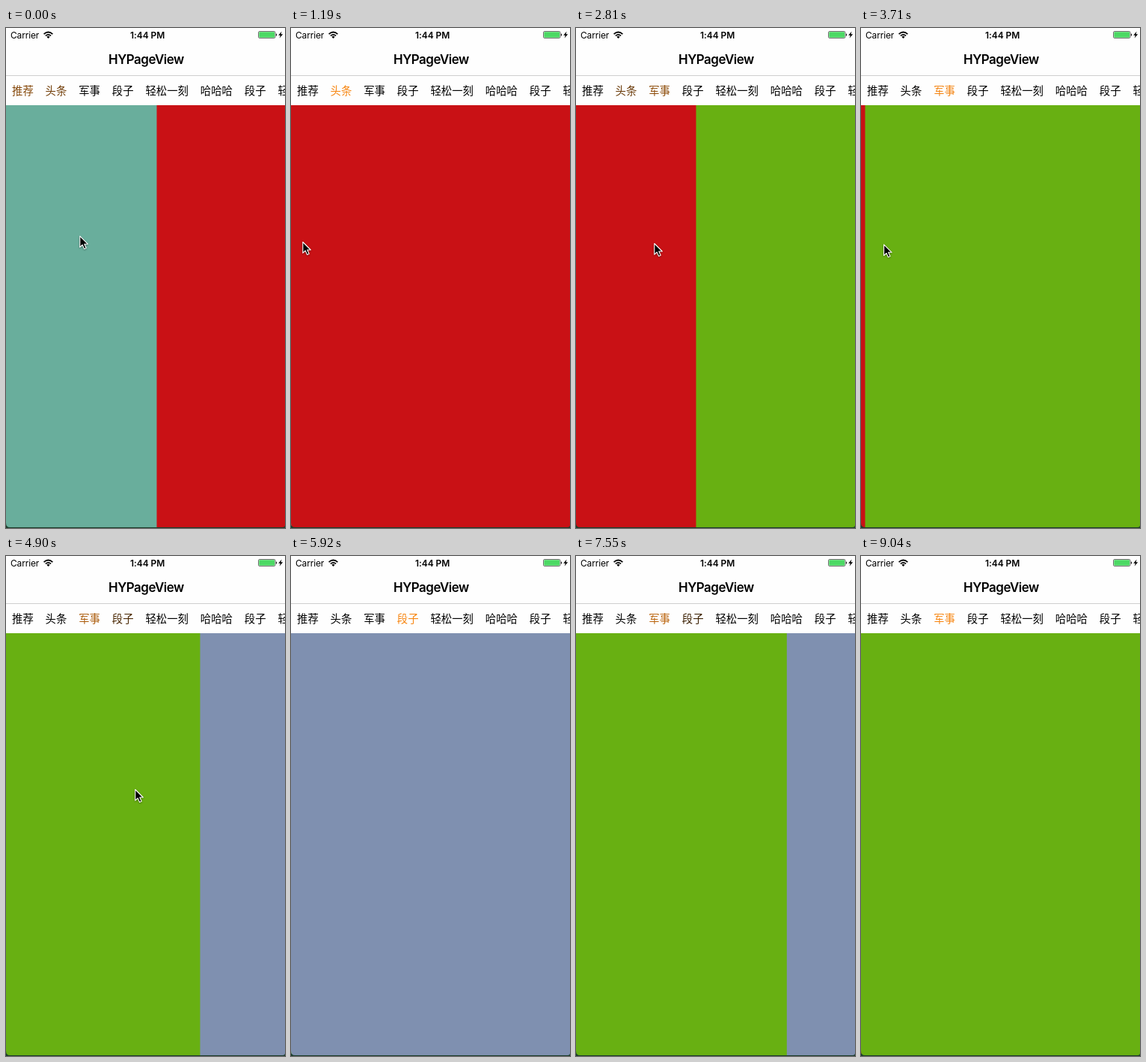
An HTML page that plays this animation: 373x667 px, repeating every 9.68 s.

```html
<!DOCTYPE html>
<html lang="zh-CN">
<head>
<meta charset="utf-8">
<title>HYPageView</title>
<style>
  html, body { margin: 0; width: 100%; height: 100%; overflow: hidden; background: #fefefe; }
  svg { display: block; width: 373px; height: 667px; }
  text { font-family: Inter, Roboto, sans-serif; }
  #tabs text { font: 14.4px "Noto Sans CJK SC", "Noto Sans CJK", "Noto Sans", sans-serif; }
</style>
</head>
<body>
<svg viewBox="0 0 373 667">
  <defs>
    <clipPath id="screen"><path d="M0 103H373V663Q373 666 370 666H5Q0 666 0 660Z"/></clipPath>
  </defs>
  <rect width="373" height="667" fill="#fefefe"/>
  <rect y="655" width="373" height="12" fill="#1b3d2b"/>
  <g clip-path="url(#screen)"><g id="pages"></g></g>

  <text x="6" y="13.6" font-size="12" letter-spacing="-.15">Carrier</text>
  <g fill="none" stroke="#000" stroke-width="1.7">
    <path d="M50.6 8.1Q56.5 2.9 62.4 8.1"/>
    <path d="M52.9 10.4Q56.5 7.2 60.1 10.4"/>
  </g>
  <path d="M54.4 11.7Q56.5 9.9 58.6 11.7L56.5 13.9Z"/>
  <text x="189.2" y="13.6" font-size="12" font-weight="600" letter-spacing="-.08" text-anchor="middle">1:44 PM</text>
  <rect x="337.5" y="4.5" width="22.5" height="9" rx="1.6" fill="#fff" stroke="#333" stroke-width=".7"/>
  <rect x="338.3" y="5.3" width="20.9" height="7.4" rx=".8" fill="#4cd964"/>
  <path d="M360.8 7.2Q362.3 7.6 362.3 9T360.8 10.8Z" fill="#222"/>
  <path d="M368.6 4.6L364.2 9.7H366.8L365.6 13.6L370.2 8.3H367.5Z"/>
  <text x="187.4" y="47.6" font-size="17" font-weight="600" letter-spacing="-.52" text-anchor="middle">HYPageView</text>
  <rect y="63" width="373" height="1" fill="#cfcfcf"/>
  <g id="tabs"></g>

  <path id="cursor" d="M.8 .5V15.2L4.2 12L6.6 17.4L9.2 16.3L6.8 11H11.3Z"
        stroke="#fff" stroke-width="1.1" stroke-linejoin="round"
        style="filter:drop-shadow(0 1px 1px rgba(0,0,0,.35))"/>
</svg>
<script>
const LOOP = 9680, TICK = 148.15, W = 373;
const COLORS = ['#69ae9c', '#c91115', '#68b012', '#7f90b0'];
const TITLES = ['推荐', '头条', '军事', '段子', '轻松一刻', '哈哈哈', '段子', '轻松一刻'];
const ORANGE = [247, 134, 18];
const DECAY = 0.57, SNAP = 4.5, REACH = 8, REST_X = 15;

// Times in ticks; x, y is where the pointer grabs the page
const SWIPES = [
  { from: 0, to: 1, start: -1.715, release: 1.5, pace: 100, power: 1, x: 269.5, y: 271 },
  { from: 1, to: 2, start: 16.875, release: 19, pace: 100, power: 1, x: 316.5, y: 287 },
  { from: 2, to: 3, start: 31.865, release: 35, pace: 100, power: 1, x: 285.5, y: 311 },
  { from: 3, to: 2, start: 44, release: 53, pace: 12.6, power: 1.597, x: 66, y: 309 }
];

const $ = id => document.getElementById(id);
const mix = (a, b, k) => a + (b - a) * k;
const smooth = k => k * k * (3 - 2 * k);
const pull = (s, n) => s.pace * (n - s.start) ** s.power;

function add(tag, parent, attrs, text = '') {
  const el = document.createElementNS('http://www.w3.org/2000/svg', tag);
  for (const key in attrs) el.setAttribute(key, attrs[key]);
  el.textContent = text;
  return parent.appendChild(el);
}

// The page follows the pointer, then glides to rest
function scrollAt(s, n) {
  const held = Math.min(n, s.release);
  const rest = (W - pull(s, held)) * DECAY ** (n - held);
  return s.to * W + (s.from - s.to) * (rest < SNAP ? 0 : rest);
}

// The pointer drags, rests, then reaches for the next grab point
function pointerAt(i, n) {
  if (n >= 55) {
    const k = (n - 55) / 5;
    return [mix(285, 302, k) - 148 * k * (1 - k), 441 + 192 * Math.sin(k * Math.PI / 2)];
  }
  const s = SWIPES[i], next = SWIPES[i + 1];
  const x = Math.max(REST_X, s.x + (s.from - s.to) * pull(s, n));
  if (!next) return [x, s.y];
  const lift = smooth(Math.min(1, (n - s.start) / 3.7));
  const y = i ? s.y : mix(257, 285, lift) + 14 * (1 - lift);
  const k = smooth(Math.max(0, 1 - (next.start - n) / REACH));
  return [mix(x, next.x, k), mix(y, next.y, k)];
}

const pointerShown = n => n < 35 || (n >= 42 && n < 51) || (n >= 55 && n < 61);

COLORS.forEach((fill, i) =>
  add('rect', $('pages'), { x: i * W, y: 103, width: W + 1, height: 564, fill }));

let left = 8;
const tabs = TITLES.map(title => {
  const el = add('text', $('tabs'), { x: left, y: 88.7 }, title);
  left += title.length * 14.4 + 15.8;
  return el;
});

function draw(ms) {
  const n = Math.floor((ms + 10) / TICK);
  const i = SWIPES.filter(s => s.start <= n).length - 1;
  const offset = scrollAt(SWIPES[i], n);
  const [x, y] = pointerAt(i, n);
  $('pages').setAttribute('transform', `translate(${-offset} 0)`);
  tabs.forEach((el, tab) => {
    const k = Math.max(0, 1 - Math.abs(offset / W - tab));
    el.setAttribute('fill', `rgb(${ORANGE.map(c => Math.round(c * k))})`);
  });
  $('cursor').setAttribute('transform', `translate(${x} ${y})`);
  $('cursor').setAttribute('visibility', pointerShown(n) ? 'visible' : 'hidden');
}

const start = performance.now();
function frame() {
  draw((performance.now() - start) % LOOP);
  requestAnimationFrame(frame);
}
frame();
</script>
</body>
</html>
```
